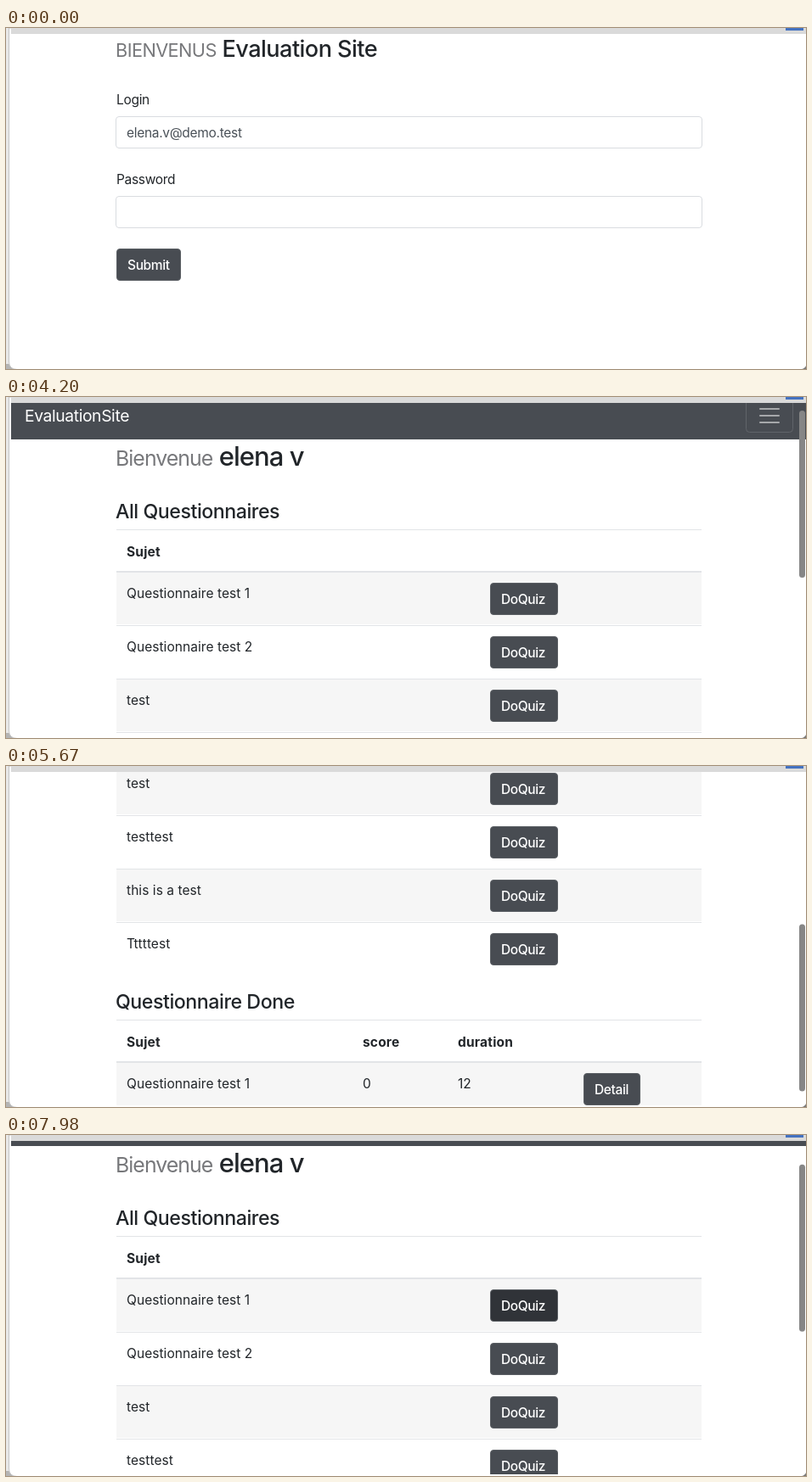
An HTML page that plays this animation: 942 px wide and 402 px high, repeating every 8 s.

```html
<!DOCTYPE html>
<html lang="fr">
<head>
<meta charset="utf-8">
<title>Evaluation Site</title>
<style>
  html, body { margin: 0; width: 100%; height: 100%; overflow: hidden; background: #fff; }
  svg { display: block; }
  text {
    font: 400 15.5px Inter, "Open Sans", sans-serif;
    font-optical-sizing: none;
    letter-spacing: -.02em;
    fill: #212529;
    white-space: pre;
  }
  .h2 { font-size: 31px; font-weight: 500; letter-spacing: -.03em; }
  .h3 { font-size: 27.1px; font-weight: 500; }
  .h4 { font-size: 23.2px; font-weight: 500; }
  .small { font-size: .8em; font-weight: 400; fill: #77787b; }
  .brand { font-size: 19.3px; fill: #fff; }
  .th { font-weight: 700; letter-spacing: .012em; }
  .cell { letter-spacing: .004em; }
  .value { fill: #495057; }
  .label { fill: #fff; font-weight: 500; letter-spacing: -.025em; }
  .button { fill: #484c52; stroke: #5a5e63; }
  .input { fill: #fff; stroke: #d9dce0; }
  .line { fill: #e2e4e7; }
</style>
</head>
<body>
<svg width="942" height="402" viewBox="0 0 942 402">
  <defs>
    <clipPath id="viewport"><path d="M4 7H942V400H8Q4 397 4 392Z"/></clipPath>
  </defs>

  <rect width="942" height="402" fill="#e8e8e8"/>
  <path d="M0 402V396H4Q5 401 12 402Z" fill="#b4b4b4"/>
  <path d="M3.5 0V393Q3.5 402.500 13 402.500H950V0Z" fill="#fff" stroke="#c4c4c4"/>
  <rect x="6" width="936" height="7" fill="#dadada"/>
  <rect x="918" width="21" height="3" fill="#4472c0"/>
  <path d="M942 398V402H937Q941 401 942 398Z" fill="#777"/>

  <g clip-path="url(#viewport)">
    <g id="login"></g>
    <g id="home"></g>
  </g>
  <rect id="scrollbar" x="934" width="7" height="197" rx="3.5" fill="#868686"/>
</svg>

<script>
const LOOP = 8000, STEP = 70;
const $ = id => document.getElementById(id);

const text = (x, y, content, cls = '') => `<text x="${x}" y="${y}" class="${cls}">${content}</text>`;
const rect = (x, y, w, h, attrs) => `<rect x="${x}" y="${y}" width="${w}" height="${h}" ${attrs}/>`;
const button = (x, y, w, label) =>
  rect(x + .5, y + .5, w - 1, 37, 'rx="3.5" class="button"') + text(x + 13, y + 25, label, 'label');
const input = (y, attrs = '') => rect(129.5, y + .5, 690, 37, `rx="3.5" class="input" ${attrs}`);
const heading = (y, small, main, cls) =>
  text(129, y, `<tspan class="small">${small}</tspan> ${main}`, cls);

// Each column is [x, title]; each row holds one text per column and the button goes last.
function table(top, title, columns, rows, action) {
  let out = text(129, top - 13, title, 'h4') + rect(130, top, 689, 1, 'class="line"');
  columns.forEach(([x, name]) => out += text(x, top + 32, name, 'th'));
  rows.forEach((cells, i) => {
    const y = top + 50 + 63 * i;
    if (i % 2 === 0) out += rect(130, y, 689, 62, 'fill="#f6f6f6"');
    out += rect(130, i ? y : y - 1, 689, i ? 1 : 2, 'class="line"');
    cells.forEach((cell, c) => out += text(columns[c][0], y + 31, cell, 'cell'));
    out += button(action.x, y + 13, action.w, action.label);
  });
  return out;
}

$('login').innerHTML =
  heading(34, 'BIENVENUS', 'Evaluation Site', 'h3') +
  text(130, 90, 'Login') + input(104) + text(142, 129, 'elena.v@demo.test', 'value') +
  text(130, 184, 'Password') +
  rect(127.5, 196.5, 694, 41, 'id="ring" rx="5" fill="none" stroke="#cfe0f5" stroke-width="3"') +
  input(198) + input(198, 'id="focus" style="stroke:#a6c4e9"') +
  '<g id="dots"></g>' + rect(150, 205, 1, 21, 'id="caret" fill="#333"') +
  button(130, 260, 76, 'Submit');

$('home').innerHTML =
  rect(6, 7, 936, 56, 'fill="#484c52"') + text(22, 42, 'EvaluationSite', 'brand') +
  rect(871.5, 15.5, 55, 39, 'rx="4" fill="none" stroke="#606469"') +
  [26, 34, 42].map(y => rect(887, y, 24, 2, 'rx="1" fill="#a6a8ab"')).join('') +
  heading(94, 'Bienvenue', 'elena v', 'h2') +
  table(169, 'All Questionnaires', [[142, 'Sujet']],
    ['Questionnaire test 1', 'Questionnaire test 2', 'test', 'testtest', 'this is a test', 'Tttttest'].map(s => [s]),
    { x: 570, w: 80, label: 'DoQuiz' }) +
  table(649, 'Questionnaire Done', [[142, 'Sujet'], [420, 'score'], [532, 'duration']],
    [['Questionnaire test 1', '0', '12']],
    { x: 680, w: 67, label: 'Detail' });

const firstButton = $('home').querySelector('.button');
const keyTimes = [1260, 1330, 1470, 1610, 2170, 2310];
const ramp = (t, start, length) => Math.min(1, Math.max(0, (t - start) / length));

// [time, scroll offset, speed in px/ms], joined by Hermite curves
const scrollKeys = [
  [3850, 0, 0], [4690, 90, .24], [5320, 270, .28], [6020, 380, 0],
  [6720, 380, 0], [7350, 50, -.1]
];

function scrollAt(t) {
  if (t <= scrollKeys[0][0]) return 0;
  const next = scrollKeys.findIndex(key => t < key[0]);
  if (next < 0) return 50;
  const [t0, p0, v0] = scrollKeys[next - 1], [t1, p1, v1] = scrollKeys[next];
  const d = t1 - t0, u = (t - t0) / d, w = 1 - u;
  return w * w * ((1 + 2 * u) * p0 + u * d * v0) + u * u * ((3 - 2 * u) * p1 - w * d * v1);
}

function mixGray(u) {
  const mix = (a, b) => Math.round(a + (b - a) * u);
  return `rgb(${mix(72, 48)},${mix(76, 51)},${mix(82, 56)})`;
}

function show(id, visible) {
  $(id).setAttribute('visibility', visible ? 'visible' : 'hidden');
}

function draw(now) {
  const t = Math.floor(now % LOOP / STEP) * STEP;
  const loggedIn = t >= 3080;
  $('login').style.display = loggedIn ? 'none' : '';
  $('home').style.display = loggedIn ? '' : 'none';

  const focus = ramp(t, 430, 130);
  $('ring').setAttribute('opacity', focus);
  $('focus').setAttribute('opacity', focus);
  const typed = keyTimes.filter(k => t >= k).length;
  $('dots').innerHTML = Array.from({ length: typed }, (_, i) =>
    `<circle cx="${146 + 7 * i}" cy="218" r="2.4" fill="#495057"/>`).join('');
  $('caret').setAttribute('x', 143 + 7 * typed);
  show('caret', t >= 980 && t < 2940);

  const scroll = Math.round(scrollAt(t));
  $('home').setAttribute('transform', `translate(0 ${-scroll})`);
  $('scrollbar').setAttribute('y', 9.5 + scroll * .506);
  show('scrollbar', t >= 3920);
  firstButton.style.fill = mixGray(ramp(t, 7420, 150));

  requestAnimationFrame(draw);
}
draw(performance.now());
</script>
</body>
</html>
```
